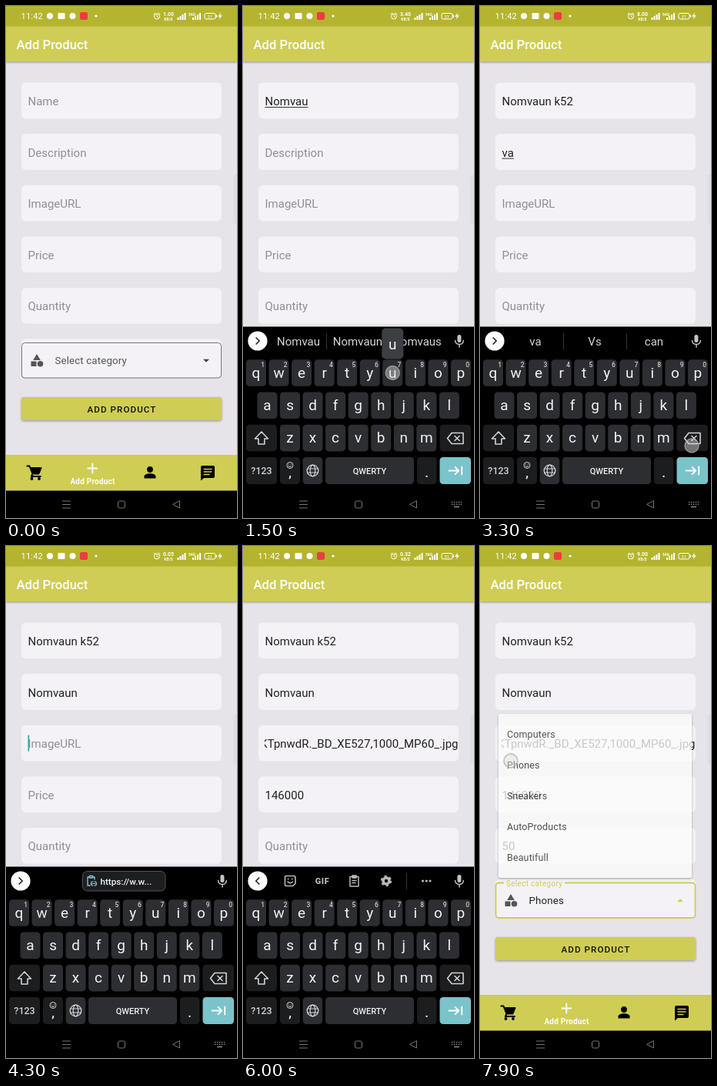
Write an HTML page that moves like this. It is 300x665 px and loops after 8000 ms.

```html
<!DOCTYPE html>
<html lang="en">
<head>
<meta charset="utf-8">
<title>Add product form</title>
<style>
  html, body { margin: 0; width: 100%; height: 100%; overflow: hidden; background: #000; }
  svg { display: block; width: 100%; height: 100%; font-family: Roboto, sans-serif; }
  text { white-space: pre; }
  .mid { text-anchor: middle; }
  .med { font-weight: 500; }
  .line { fill: none; stroke: currentColor; stroke-linecap: round; stroke-linejoin: round; }
  .value { font-size: 15px; }
  .body { font-size: 13.33px; letter-spacing: .12px; }
  .item { font-size: 12.5px; letter-spacing: .13px; fill: #222; }
  .letter { font-size: 19px; fill: #f2f2f4; text-anchor: middle; }
  .caps .letter { text-transform: uppercase; }
  .digit { font-size: 8.5px; font-weight: 500; fill: #d0d0d3; text-anchor: middle; }
</style>
</head>
<body>
<svg id="stage" viewBox="0 0 300 665" preserveAspectRatio="none"></svg>
<script>
const LOOP = 8000, STEP = 100;
const BRAND = 'Nomvaun';
const IMAGE = 'uW53KTpnwdR._BD_XE527,1000_MP60_.jpg';
const HINTS = ['Name', 'Description', 'ImageURL', 'Price', 'Quantity'];
const CATEGORIES = ['Computers', 'Phones', 'Sneakers', 'AutoProducts', 'Beautifull'];
const ROWS = ['qwertyuiop', 'asdfghjkl', 'zxcvbnm'];
const YELLOW = '#cfcd54', CARD = '#f4f2f6';

const rect = (x, y, w, h, fill, r = 0, more = '') =>
  `<rect x="${x}" y="${y}" width="${w}" height="${h}" rx="${r}" fill="${fill}" ${more}/>`;
const dot = (x, y, r, fill, more = '') => `<circle cx="${x}" cy="${y}" r="${r}" fill="${fill}" ${more}/>`;
const label = (x, y, str, more = '') => `<text x="${x}" y="${y}" ${more}>${str}</text>`;
const line = (d, color, width = 1.5, more = '') =>
  `<path d="${d}" class="line" style="color:${color}" stroke-width="${width}" ${more}/>`;
const shape = (d, fill, more = '') => `<path d="${d}" fill="${fill}" ${more}/>`;
const each = (list, fn) => [...list].map(fn).join('');
const fieldY = i => 99.5 + i * 66.6;

// Centres of the touchable keys
const keys = { shift: [24, 561], back: [276, 561], enter: [276, 604] };
ROWS.forEach((row, r) => [...row].forEach((ch, i) => {
  keys[ch] = [[17, 31.5, 61][r] + i * 29.55, 476.5 + r * 42.3];
}));
const digitKey = d => ROWS[0][(+d + 9) % 10];

function signal(x) {
  return each([0, 1, 2, 3], i => rect(x + i * 3, 15 - i * 2, 2, 3 + i * 2, '#fff'));
}

function statusBar() {
  return rect(0, 0, 300, 26.5, '#b5b430') +
    label(19.5, 17, '11:42', 'font-size="11" letter-spacing=".2" fill="#fff"') +
    dot(57, 13, 4, '#fff') + rect(67.5, 9, 9, 8, '#fff', 1) + dot(86.5, 13, 4, '#fff') +
    rect(96, 8, 10, 10, '#ee3b42', 2) + dot(117, 13, 1.6, '#fff') +
    dot(196, 13.5, 3.5, 'none', 'stroke="#fff"') +
    line('M196 11.5V13.7L197.5 14.5M192 10.5L194 9M200 10.5L198 9', '#fff', .9) +
    label(211, 13, '', 'id="speed" class="mid" font-size="7" font-weight="700" fill="#fff"') +
    label(211, 18.5, 'KB/S', 'class="mid" font-size="5" font-weight="700" fill="#fff"') +
    signal(222.5) + label(237, 12.5, '54G', 'font-size="5" font-weight="700" fill="#fff"') + signal(242) +
    rect(258, 9.5, 14, 7.5, 'none', 2, 'stroke="#fff"') + rect(272.5, 11.5, 1.5, 3.5, '#fff') +
    label(264.8, 15.5, '31', 'class="mid" font-size="6" fill="#fff"') +
    shape('M279 8.5L275 13.7H277.7L276.7 17.5L281 12.3H278.2Z', '#fff');
}

function form() {
  return rect(0, 26, 300, 557, '#e6e4e8') +
    rect(0, 26, 300, 46, YELLOW, 0, 'filter="url(#shadow)"') +
    label(13.5, 55.5, 'Add Product', 'class="med" font-size="16.67" fill="#fff"') +
    rect(295, 219, 8, 64, '#dfdde1', 3) +
    each(HINTS, (hint, i) => rect(20, fieldY(i), 260, 46.8, CARD, 6) +
      `<g clip-path="url(#fieldClip)">${label(28.5, fieldY(i) + 29.5, hint, `id="field${i}" class="value"`)}</g>`) +
    rect(0, 0, 1.7, 21, '#3aa0aa', 0, 'id="caret"') + rect(0, 0, 0, 1, '#333', 0, 'id="underline"') +
    rect(20, 432.5, 260, 47, CARD, 6) +
    rect(20.5, 437.5, 259, 45.5, CARD, 4, 'id="box"') +
    `<g id="floating">${rect(31, 436, 79, 3, CARD)}${label(34, 442, 'Select category',
      `font-size="10" letter-spacing=".3" fill="${YELLOW}"`)}</g>` +
    shape('M40 452L44.8 460H35.2Z', '#555') + rect(32.5, 461.5, 7, 6.5, '#555') + dot(44.5, 464.7, 3.8, '#555') +
    label(63.5, 465.3, '', 'id="category" class="body"') + '<path id="arrow"/>' +
    rect(20, 508, 260, 30, YELLOW, 3, 'filter="url(#shadow)"') +
    label(150.5, 528, 'ADD PRODUCT', 'class="mid med" font-size="11.67" letter-spacing="1.04" fill="#111"') +
    rect(0, 583, 300, 47, YELLOW) +
    line('M27.5 597.5H30.5L34.5 607.5H42.5L45.5 600H32M34.5 607.5L33 611H45', '#000', 2) +
    shape('M32 600H46L42.5 607H35Z', '#000') + dot(33.5, 614, 1.9, '#000') + dot(43, 614, 1.9, '#000') +
    line('M112.3 594.5V606.5M106.3 600.5H118.3', '#fff', 1.8) +
    label(112.5, 621, 'Add Product', 'class="mid" font-size="10" font-weight="700" letter-spacing=".2" fill="#fff"') +
    dot(187, 602, 3.9, '#000') + shape('M179.5 613.5V611C179.5 606 194.5 606 194.5 611V613.5Z', '#000') +
    shape('M255 597H269Q271 597 271 599V611Q271 613 269 613H257L253 616.5V599Q253 597 255 597Z', '#000') +
    line('M257 601.5H267M257 605H267M257 608.5H264', YELLOW, 1.4);
}

function popup() {
  return `<g id="popup">${rect(24, 218, 251, 213, '#fdfdfd', 3, 'filter="url(#shadow)"')}${
    each(CATEGORIES, (name, i) => label(35, 249 + i * 40.1, name, 'class="item"'))}</g>`;
}

function toolbar() {
  return dot(19, 435, 12.6, '#fff') + line('', '#222', 1.7, 'id="chevron"') +
    rect(278.4, 427, 5, 10, '#c4c4c8', 2.5) + line('M275.5 434.5Q276 439.5 281 439.5T286.3 434.5M281 439.5V443', '#c4c4c8', 1.5) +
    `<g id="chip">${rect(99.5, 422.5, 107.5, 25.5, '#1d1e20', 6, 'stroke="#505256"')}${
      line('M108 430H106V441H109M113 430H115V433M108.5 428.5H112.5V431H108.5Z', '#8fc9d2', 1.3)}${
      line('M113 436H111.5Q109.5 438.5 111.5 441H113M115 436H116.5Q118.5 438.5 116.5 441H115M112.5 438.5H115.5', '#8fc9d2', 1.2)}${
      label(122.5, 440, 'https://w.w...', 'class="med" font-size="11.67" fill="#f4f4f6"')}</g>` +
    `<g id="words">${line('M108.5 425V446M190.5 425V446', '#333437', 1)}${
      each([72, 149, 226], (x, i) => label(x, 440.5, '', `id="word${i}" class="mid" font-size="15" fill="#d4d4d8"`))}</g>` +
    `<g id="tools">${line('M65 441.5H56.5Q54.5 441.5 54.5 439.5V430.5Q54.5 428.5 56.5 428.5H66Q68 428.5 68 430.5V438.5ZM58 436Q61 439.5 64.5 436M58.5 432.5H59M63.5 432.5H64', '#b9b9bd', 1.6)}${
      label(103, 439, 'GIF', 'class="mid" font-size="11" font-weight="900" letter-spacing=".6" fill="#b9b9bd"')}${
      line('M139 429.5H150V442H139ZM142 428H147V431H142ZM142 434.5H147M142 437.5H146', '#b9b9bd', 1.5)}${
      dot(186, 435, 4, 'none', 'stroke="#b9b9bd" stroke-width="3.6"')}${
      dot(186, 435, 6.2, 'none', 'stroke="#b9b9bd" stroke-width="2" stroke-dasharray="3.25 3.25"')}${
      line('M212.5 425V446', '#333437', 1)}${each([233.5, 238.3, 243], x => dot(x, 435, 1.6, '#b9b9bd'))}</g>`;
}

function keyboard() {
  const dark = '#1c1d1f', key = '#2d2e31', ink = '#d2d2d6';
  const letters = each(ROWS.join(''), ch => {
    const [x, y] = keys[ch], n = ROWS[0].indexOf(ch);
    return rect(x - 13, y - 17.3, 26, 34.6, key, 4.5) + label(x, y + 6.3, ch, 'class="letter"') +
      (n < 0 ? '' : label(x + 8.7, y - 7.5, (n + 1) % 10, 'class="digit"'));
  });
  return `<g id="keyboard">${rect(0, 416.5, 300, 250, '#000')}${toolbar()}${letters}` +
    rect(4, 543.7, 40, 34.6, dark, 4.5) + line('M24 553L15.5 562H20V569H28V562H32.5Z', ink, 1.6) +
    rect(255.5, 543.7, 40.5, 34.6, dark, 4.5) +
    line('M271 554.5H286V568.5H271L265.5 561.5ZM275 558.5L281 564.5M281 558.5L275 564.5', ink, 1.6) +
    rect(4, 586, 40, 35, dark, 4.5) + label(24, 608.3, '?123', `class="mid med" font-size="12.5" fill="${ink}"`) +
    rect(48, 586, 26, 35, dark, 4.5) + label(61, 612, ',', 'class="mid med" font-size="17" fill="#eee"') +
    dot(61, 596.5, 4, 'none', `stroke="${ink}"`) + line('M59 597.5Q61 600 63 597.5M59.5 595.2V595.3M62.5 595.2V595.3', ink, 1) +
    rect(77.7, 586, 25.6, 35, key, 4.5) + dot(90.5, 603.5, 7.3, 'none', `stroke="${ink}" stroke-width="1.3"`) +
    `<ellipse cx="90.5" cy="603.5" rx="3.3" ry="7.3" fill="none" stroke="${ink}" stroke-width="1.2"/>` +
    line('M84 601H97M84 606H97', ink, 1.2) +
    rect(107, 586, 115, 35, key, 4.5) + label(164.5, 608, 'QWERTY', 'class="mid med" font-size="11" fill="#eee"') +
    rect(226, 586, 25.5, 35, dark, 4.5) + label(238.7, 611.5, '.', 'class="mid med" font-size="17" fill="#eee"') +
    rect(255.5, 586, 40.5, 35, '#7bc3ca', 4.5) +
    line('M267.5 603.5H280M275.5 598.8L280.2 603.5L275.5 608.2M284.2 598.5V608.5', '#fff', 1.8) +
    `<g id="preview">${rect(-14, -58, 28, 40, '#3d3e42', 5)}${label(0, -31, '', 'id="previewChar" class="letter"')}</g></g>`;
}

function systemBar() {
  const grey = '#77777a';
  return rect(0, 629.5, 300, 36, '#000') + line('M73.5 643H83.5M73.5 647.5H83.5M73.5 652H83.5', grey, 1) +
    rect(145.5, 643, 9, 9, 'none', 2, `stroke="${grey}"`) + line('M225.5 643V652L217 647.5Z', grey, 1) +
    `<g id="switcher">${line('M271.5 644.5H283.5M271.5 647.2H283.5', '#8b8b8e', 1.6, 'stroke-dasharray=".2 2.8"')}${
      line('M274.5 650.5H280.5', '#8b8b8e', 1.3)}</g>`;
}

const stage = document.getElementById('stage');
stage.innerHTML = `<defs>
  <filter id="shadow" x="-5%" y="-20%" width="110%" height="150%"><feDropShadow dx="0" dy="1.2" stdDeviation="1.4" flood-opacity=".35"/></filter>
  <clipPath id="fieldClip"><rect x="28" y="90" width="252" height="340"/></clipPath></defs>` +
  form() + statusBar() + popup() + keyboard() + systemBar() +
  dot(0, 0, 9, '#ddd', 'id="touch" fill-opacity=".45" stroke="#aaa" stroke-opacity=".8" stroke-width="1.4"');
const ui = {};
stage.querySelectorAll('[id]').forEach(el => ui[el.id] = el);

// Script of the session: step number -> changes
const script = {};
const at = (step, change) => { script[step] = { ...script[step], ...change }; };
const guesses = str => [str, BRAND, str + 's'];
function type(step, field, before, str, words = true) {
  [...str].forEach((ch, i) => {
    const typed = str.slice(0, i + 1), digit = /\d/.test(ch);
    at(step + i, {
      ['f' + field]: before + typed, key: digit ? digitKey(ch) : ch.toLowerCase(), char: ch, caps: false,
      ...(words && { bar: 'words', words: guesses(typed), composing: !digit })
    });
  });
}
const pick = [149, 435];
at(1, { touch: [60, 124] });
at(2, { focus: 0, lift: .5 });
at(3, { lift: 1 });
at(9, { key: 'shift', caps: true });
type(10, 0, '', BRAND);
at(18, { touch: pick });
at(19, { f0: BRAND + ' ', bar: 'chip', composing: false });
type(23, 0, BRAND + ' ', 'k52');
at(26, { key: 'enter', composing: false });
at(27, { focus: 1, bar: 'chip' });
type(30, 1, '', 'va');
at(32, { words: ['va', 'Vs', 'can'] });
at(33, { touch: [275, 571] });
at(34, { f1: 'v', touch: [275, 571], words: ['v', 'V', 'very'] });
at(35, { f1: '', touch: [275, 571], bar: 'chip', composing: false });
at(36, { key: 'shift', caps: true });
type(37, 1, '', BRAND.slice(0, 3));
at(40, { touch: pick });
at(41, { f1: BRAND, bar: 'chip', composing: false });
at(42, { touch: [100, 257] });
at(43, { focus: 2 });
at(45, { touch: [152, 435] });
at(46, { f2: IMAGE, bar: 'tools' });
at(48, { key: 'enter' });
at(49, { focus: 3 });
type(53, 3, '', '146000', false);
at(61, { key: 'enter' });
at(62, { focus: 4 });
type(64, 4, '', '50', false);
at(67, { lift: .5 });
at(68, { lift: 0, focus: -1 });
at(72, { touch: [150, 460], active: true });
at(73, { popup: 1 });
at(78, { touch: [40, 279] });
at(79, { touch: [40, 279], popup: .76, category: 'Phones' });
Object.entries({ 5: '0.21', 8: '1.00', 12: '3.40', 16: '0.12', 20: '0.53', 25: '0.47', 29: '2.10', 32: '8.00', 37: '0.64',
  41: '0.05', 46: '12.0', 51: '0.90', 56: '0.18', 59: '0.32', 64: '1.20', 68: '0.75', 72: '9.00' })
  .forEach(([step, speed]) => at(step, { speed }));
at(4, { speed: '1.00' });

const still = new Set([7, 17, 71, 74, 75, 76, 77]);
const states = [{ step: 0, speed: '1.00', focus: -1, lift: 0, bar: 'chip', words: guesses(''), popup: 0,
  f0: '', f1: '', f2: '', f3: '', f4: '' }];
for (let i = 1; i < LOOP / STEP; i++) {
  const last = states[i - 1];
  states.push(still.has(i) ? last : { ...last, touch: null, key: null, char: null, step: i, ...script[i] });
}

const show = (el, on) => el.setAttribute('visibility', on ? 'inherit' : 'hidden');
const set = (el, attrs) => Object.entries(attrs).forEach(([name, v]) => el.setAttribute(name, v));

function drawFields(s) {
  HINTS.forEach((hint, i) => {
    const str = s['f' + i], el = ui['field' + i], long = str.length > 25;
    el.textContent = str || hint;
    set(el, { fill: str ? '#222' : '#918f94', x: long ? 279.5 : 28.5, 'text-anchor': long ? 'end' : 'start' });
  });
  const focused = s.focus >= 0, str = focused ? s['f' + s.focus] : '';
  const width = str ? ui['field' + s.focus].getComputedTextLength() : 0;
  const top = fieldY(Math.max(s.focus, 0));
  set(ui.caret, { x: Math.min(28.5 + width, 278), y: top + 13 });
  show(ui.caret, focused && [1, 2].includes(s.step % 6));
  const head = str.lastIndexOf(' ') + 1;
  const start = head ? ui['field' + s.focus].getSubStringLength(0, head) : 0;
  set(ui.underline, { x: 28.5 + start, y: top + 31.5, width: Math.max(0, width - start) });
  show(ui.underline, s.composing && str);
}

function drawCategory(s) {
  set(ui.box, { stroke: s.active ? YELLOW : '#77757a', 'stroke-width': s.active ? 1.8 : 1 });
  show(ui.floating, s.active);
  ui.category.textContent = s.category || (s.active ? '' : 'Select category');
  set(ui.category, { fill: s.category ? '#222' : '#555' });
  set(ui.arrow, { d: s.active ? 'M256 462.3H264L260 458.3Z' : 'M256 458.7H264L260 462.7Z', fill: s.active ? YELLOW : '#444' });
  set(ui.popup, { opacity: s.popup });
}

function drawKeyboard(s) {
  show(ui.keyboard, s.lift);
  show(ui.switcher, s.lift === 1);
  set(ui.keyboard, { transform: `translate(0 ${(1 - s.lift) * 213})`, class: s.caps ? 'caps' : '' });
  ['chip', 'words', 'tools'].forEach(name => show(ui[name], s.bar === name));
  s.words.forEach((word, i) => ui['word' + i].textContent = word);
  set(ui.chevron, { d: s.bar === 'tools' ? 'M20.8 431L16.8 435L20.8 439' : 'M17.2 431L21.2 435L17.2 439' });
  show(ui.preview, s.char);
  if (s.char) {
    set(ui.preview, { transform: `translate(${keys[s.key]})` });
    ui.previewChar.textContent = s.char;
  }
}

function draw(s) {
  ui.speed.textContent = s.speed;
  drawFields(s);
  drawCategory(s);
  drawKeyboard(s);
  const spot = s.touch || keys[s.key];
  show(ui.touch, spot);
  if (spot) set(ui.touch, { cx: spot[0], cy: spot[1] });
}

let shown;
const origin = performance.now();
function tick() {
  const state = states[Math.floor((performance.now() - origin) % LOOP / STEP)];
  if (state !== shown) draw(shown = state);
  requestAnimationFrame(tick);
}
tick();
</script>
</body>
</html>
```
